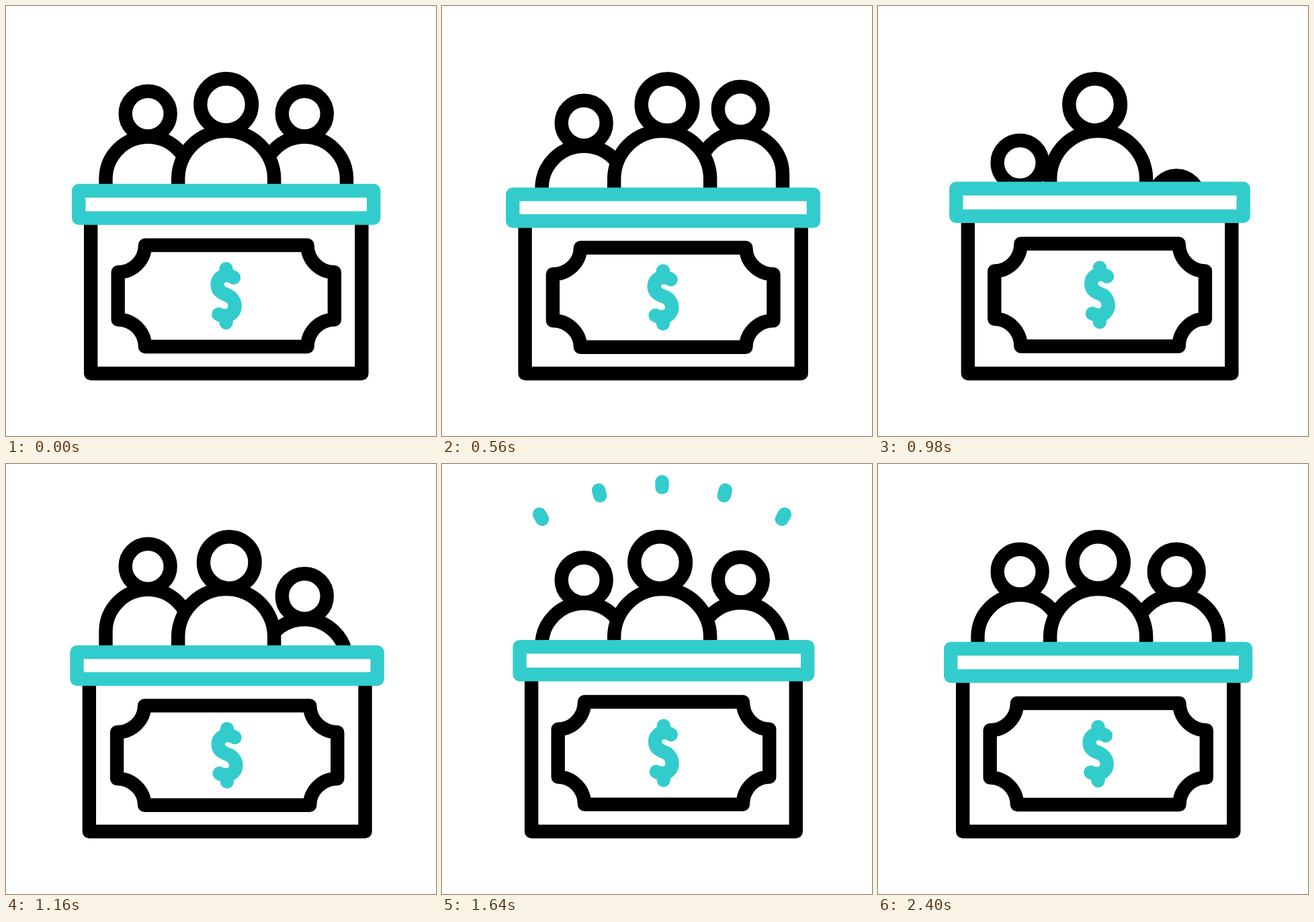
Animation of 640x640 px, one loop 2500 ms. Source, as an HTML page:

```html
<!DOCTYPE html>
<html lang="en">
<head>
<meta charset="utf-8">
<title>Team behind a money counter</title>
<style>
  html, body { margin: 0; width: 100%; height: 100%; overflow: hidden; background: #fff; }
  svg { display: block; width: 100%; height: 100%; }
</style>
</head>
<body>
<svg viewBox="0 0 640 640" fill="#fff" stroke="#000" stroke-width="20.4" stroke-linejoin="round">
  <g id="rays" stroke="#33cccc" stroke-linecap="round"></g>
  <g id="left">
    <circle cx="211.2" cy="160.3" r="33.5"/>
    <path d="M148.5 300V257.5a62.7 62.7 0 0 1 125.4 0V300"/>
  </g>
  <g id="right">
    <circle cx="444.3" cy="160.3" r="33.5"/>
    <path d="M381.6 300V257.5a62.7 62.7 0 0 1 125.4 0V300"/>
  </g>
  <circle id="head" cx="327.6" cy="146.5" r="38.3"/>
  <path d="M256.2 300V257.5a71.5 71.5 0 0 1 143 0V300"/>
  <path id="desk"/>
  <path id="bill"/>
  <path id="bar" stroke="#33cccc"/>
  <path id="dollar" fill="none" stroke="#33cccc" stroke-linecap="round"/>
</svg>
<script>
const LOOP = 2500, STEP = 20, SIDE_LAG = 115;
const el = id => document.getElementById(id);

// Keys are [time, value] pairs joined by sine easing.
const headKeys = [[120, 0], [375, 20], [800, -11.5], [1220, 5.5], [1640, -3], [2050, 0.8], [2400, 0]];
const sideKeys = [[120, 0], [480, -7], [800, 135], [1200, -11.5], [1580, 13], [2020, 0]];
const squashKeys = [[120, 0], [350, -13], [900, 6], [1250, -9], [1550, 4], [2050, 0]];
const restKeys = [[120, 1], [350, 0], [1550, 0], [2050, 1]];

function track(keys, t) {
  if (t <= keys[0][0]) return keys[0][1];
  for (let i = 1; i < keys.length; i++) {
    const [a, from] = keys[i - 1], [b, to] = keys[i];
    if (t < b) return from + (to - from) * (1 - Math.cos(Math.PI * (t - a) / (b - a))) / 2;
  }
  return keys[keys.length - 1][1];
}

const ramp = (t, a, b) => Math.min(1, Math.max(0, (t - a) / (b - a)));

const rays = [-29.6, -14.8, 0, 14.8, 29.6].map(angle => {
  const line = document.createElementNS("http://www.w3.org/2000/svg", "line");
  line.setAttribute("transform", `rotate(${angle} 327.5 396)`);
  line.setAttribute("x1", 327.5);
  line.setAttribute("x2", 327.5);
  el("rays").append(line);
  return line;
});

function drawRays(t) {
  const lead = 52 - 40 * ramp(t, 1400, 1780);
  const tail = 52 - 40 * ramp(t, 1520, 1800);
  const alpha = ramp(t, 1400, 1450) * (1 - ramp(t, 1720, 1800));
  el("rays").setAttribute("opacity", alpha);
  el("rays").setAttribute("display", alpha > 0 ? "inline" : "none");
  for (const ray of rays) {
    ray.setAttribute("y1", tail);
    ray.setAttribute("y2", lead);
  }
}

// The counter stretches from its base while line weights stay fixed.
function drawCounter(t) {
  const v = track(squashKeys, t);
  const x0 = 112.2 + v - 4 * track(restKeys, t);
  const x1 = 547.2 - 0.82 * v;
  const sx = (x1 - x0) / 439;
  const sy = (272 + 0.77 * v) / 272;
  const p = (x, y) => `${(x0 + (x - 108.2) * sx).toFixed(2)} ${(547 + (y - 547) * sy).toFixed(2)} `;
  const path = (id, d) => el(id).setAttribute("d", d);
  const notch = (x, y) => `A${40.3 * sx} ${40.3 * sy} 0 0 1 ${p(x, y)}`;

  path("desk", `M${p(126.2, 310)}L${p(126.2, 547)}L${p(529.4, 547)}L${p(529.4, 310)}`);
  path("bar", `M${p(108.2, 275)}L${p(547.2, 275)}L${p(547.2, 315.6)}L${p(108.2, 315.6)}Z`);
  path("bill",
    `M${p(207, 356)}L${p(448.6, 356)}A${40.3 * sx} ${40.3 * sy} 0 0 0 ${p(488.9, 396.3)}` +
    `L${p(488.9, 466.7)}A${40.3 * sx} ${40.3 * sy} 0 0 0 ${p(448.6, 507)}` +
    `L${p(207, 507)}A${40.3 * sx} ${40.3 * sy} 0 0 0 ${p(166.7, 466.7)}` +
    `L${p(166.7, 396.3)}A${40.3 * sx} ${40.3 * sy} 0 0 0 ${p(207, 356)}Z`);
  path("dollar",
    `M${p(327.6, 391.3)}L${p(327.6, 401)}M${p(339, 404.3)}` +
    `C${p(335, 401.5)}${p(331, 400.6)}${p(327, 401)}` +
    `C${p(319, 402)}${p(314.6, 408)}${p(314.6, 414.5)}` +
    `C${p(314.6, 421)}${p(318, 425.5)}${p(325, 428.5)}L${p(331, 431)}` +
    `C${p(337, 434)}${p(340.7, 440)}${p(340.7, 447)}` +
    `C${p(340.7, 455)}${p(334, 461.3)}${p(327, 461.3)}` +
    `C${p(323, 461.3)}${p(320, 461)}${p(316.4, 458.8)}` +
    `M${p(327.6, 461)}L${p(327.6, 471.3)}`);
}

function draw(t) {
  const shift = track(headKeys, t);
  const turn = Math.asin(shift / 111) * 180 / Math.PI;
  el("head").setAttribute("transform", `rotate(${turn} 327.6 257.5)`);
  el("left").setAttribute("transform", `translate(0 ${track(sideKeys, t)})`);
  el("right").setAttribute("transform", `translate(0 ${track(sideKeys, t - SIDE_LAG)})`);
  drawRays(t);
  drawCounter(t);
}

const start = performance.now();
function tick() {
  const t = (performance.now() - start) % LOOP;
  draw(Math.min(2400, Math.floor(t / STEP) * STEP));
  requestAnimationFrame(tick);
}
draw(0);
requestAnimationFrame(tick);
</script>
</body>
</html>
```
